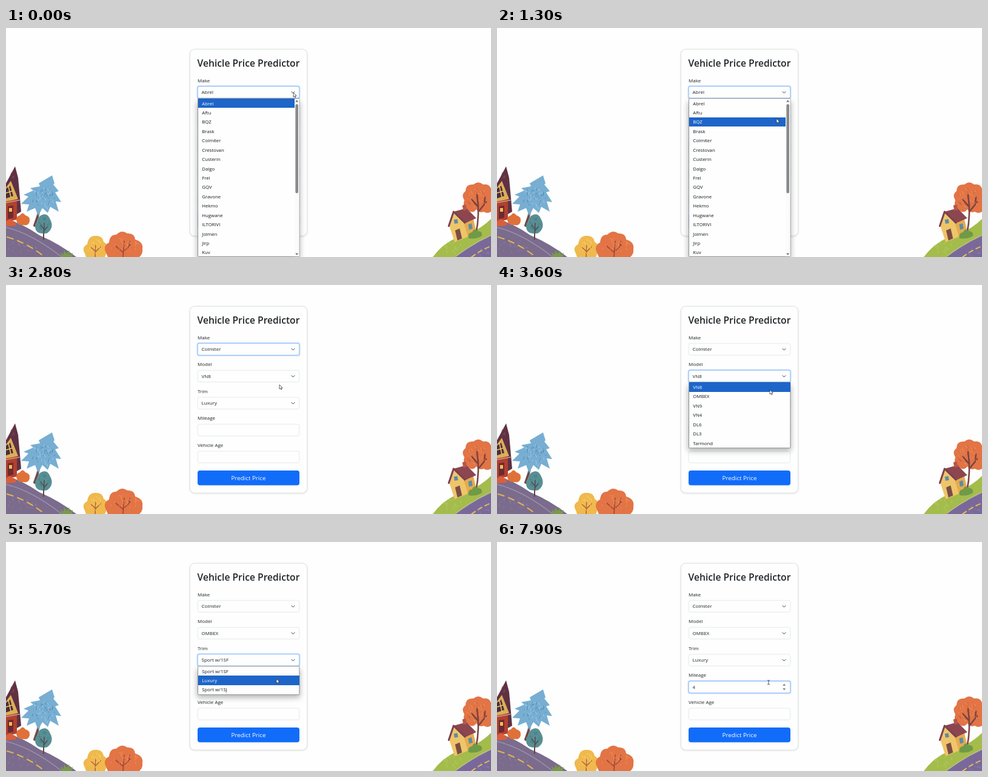
An HTML page that plays this animation: 800x379 px, repeating every 8000 ms.

```html
<!DOCTYPE html>
<html lang="en">
<head>
<meta charset="utf-8">
<title>Vehicle Price Predictor</title>
<style>
  html, body { margin: 0; height: 100%; overflow: hidden; background: #fdfefd; }
  svg { display: block; width: 100vw; height: 100vh; }
  text { font: 8px "Open Sans", "Noto Sans", sans-serif; fill: #212529; }
  .title { font-size: 15.65px; font-weight: 600; text-anchor: middle; }
  .action { font-size: 9.8px; fill: #fff; text-anchor: middle; }
  .option { font-size: 7.8px; fill: #15181b; }
  .option.on { fill: #fff; }
  .line { fill: none; stroke-linecap: round; stroke-linejoin: round; }
</style>
</head>
<body>
<svg viewBox="0 0 800 379">
  <defs>
    <filter id="soft" x="-30%" y="-30%" width="160%" height="160%"><feGaussianBlur stdDeviation="5"/></filter>
    <filter id="faint"><feGaussianBlur stdDeviation="1.5"/></filter>
  </defs>

  <!-- left scenery -->
  <path d="M0 316Q28 324 55 343Q88 357 116 379H0Z" fill="#7b6b8d"/>
  <path class="line" d="M0 330Q42 340 92 379" stroke="#9c91a8" stroke-width="1.5"/>
  <path class="line" d="M2 346Q34 355 64 379" stroke="#dcb552" stroke-width="2.2" stroke-dasharray="10 8"/>
  <path d="M0 257L15 229L20 248L25 304L18 308L0 310Z" fill="#5f3143"/>
  <path d="M0 264L8 253L20 283L0 288Z" fill="#dcae58"/>
  <path d="M0 266l7-5 5 17-12 4Z" fill="#4b2d3d"/>
  <path class="line" d="M0 273l10-3M4 262l4 18" stroke="#f0c863" stroke-width="1.5"/>
  <path d="M0 287l18-3v33l-18 4Z" fill="#b2402f"/>
  <path d="M3 295l9-1v20l-9 2Z" fill="#6b2a32"/>
  <path d="M5 298h5v6h-5Z" fill="#f0bd55"/>
  <path class="line" d="M0 289L22 285" stroke="#c9a58f" stroke-width="1.5"/>
  <path d="M17 318q0-7 6-8q4-7 9 0q8 2 7 10q-2 8-10 6q-10 2-12-8Z" fill="#df7138"/>
  <path d="M0 320q6-6 11-1q7 1 5 8l-16 1Z" fill="#d95f3b"/>
  <path class="line" d="M56 296Q53 312 47 327" stroke="#6f4a48" stroke-width="4"/>
  <path d="M76 244L80 257L78 259L87 270L81 272L91 288L82 287L87 304L73 296L69 306L60 298L53 311L48 298L34 304L38 292L25 291L37 279L29 276L45 269L40 265L56 262L54 257Z" fill="#77aed2"/>
  <path class="line" d="M62 315V350" stroke="#684a46" stroke-width="2"/>
  <path d="M60 309q8-3 12 6q6 10 2 18q-5 9-14 7q-11 0-12-11q0-7 4-9q0-8 8-11Z" fill="#588f94"/>
  <path class="line" d="M62 348l1-25M62 336l6-7M62 332l-5-6" stroke="#5a4549" stroke-width="1.5"/>
  <path d="M92 379l-2-8 5 4 1-7 4 6 4-6 1 7 5-3-2 7Z" fill="#789b49"/>
  <path d="M130 373q-6-10 4-15q2-15 14-14q11-1 13 10q10 6 6 16l-4 9h-31Z" fill="#f0b94d"/>
  <path d="M165 372q-6-11 5-17q1-13 12-13q9-9 18-2q12-1 13 10q14 4 12 16q1 8-5 13h-52Z" fill="#e37446"/>
  <path class="line" d="M147 379l1-20M148 370l8-8M148 370l-8-7" stroke="#b0653c" stroke-width="1.6"/>
  <path class="line" d="M193 379l2-26M194 370l11-11M193 371l-12-10M203 361l1-8" stroke="#a04a3c" stroke-width="1.8"/>

  <!-- right scenery -->
  <path d="M704 379Q719 358 743 347Q778 338 800 316V379Z" fill="#a3bc4b"/>
  <path d="M741 379Q768 358 800 343V379Z" fill="#79699a"/>
  <path class="line" d="M742 378Q768 358 800 343" stroke="#c3bc92" stroke-width="1.5"/>
  <path class="line" d="M768 379Q784 367 800 361" stroke="#e8bf55" stroke-width="2" stroke-dasharray="7 6"/>
  <path d="M756 285q-6-9 2-15q0-12 13-11q8-7 16 0q10-2 13 7v38q-6 4-12 0q-8 3-12-4q-6 8-13 2q-11-3-7-17Z" fill="#e27446"/>
  <path class="line" d="M775 341Q782 308 777 276M780 303l12-15M779 296l-11-12M789 291l1-11" stroke="#7c4440" stroke-width="2.6"/>
  <g transform="rotate(-10 752 324)">
    <path d="M731 324l11-22 14 20 2 25-23 5Z" fill="#efc56a"/>
    <path d="M755 321l17-2 1 24-15 4Z" fill="#e5ab50"/>
    <path d="M741 302l23-2 13 19-20 5Z" fill="#8c4650"/>
    <path class="line" d="M730 324L742 302L757 323" stroke="#7b4150" stroke-width="3"/>
    <path d="M739 333l8-2 1 17-8 2Z" fill="#7b4d45"/>
    <path d="M740 315h6v7h-6ZM762 327l6-1v9l-6 1Z" fill="#5d8da3"/>
    <path d="M758 303v-9h6v9Z" fill="#b3584a"/>
  </g>
  <path d="M763 348q-2-9 6-10q3-8 9-2q8 0 7 8q-9 6-22 4Z" fill="#6f9a48"/>
  <g id="dabs"></g>

  <g id="ui"></g>
</svg>
<script>
const LOOP = 8000, ROW = 15.43;
const TOPS = { make: 96.5, model: 141, trim: 185.6, mileage: 230.2, age: 274.8 };
const LABELS = { make: "Make", model: "Model", trim: "Trim", mileage: "Mileage", age: "Vehicle Age" };
const MAKES = ["Abrel", "Aftu", "BQZ", "Brask", "Colmiter", "Crestovan", "Custerin", "Dalgo", "Frel",
  "GQV", "Gravone", "Hekmo", "Hugwane", "ILTORIVI", "Jolmen", "Jirp", "Kuv"];
const MODELS = ["VN8", "OMBEX", "VN9", "VN4", "DL6", "DL3", "Tarmond"];
const TRIMS = ["Sport w/1SF", "Luxury", "Sport w/1SJ"];

// Pointer tip: time, x, y
const PATH = [[0, 474, 107], [400, 474, 108], [900, 467, 128], [1300, 461, 150], [1900, 456, 184],
  [2300, 455, 186], [2800, 451, 165], [3100, 452, 152], [3300, 452, 152], [3800, 449, 185],
  [4100, 449, 185], [4300, 448, 182], [4750, 448, 196], [5000, 447, 198], [5700, 446, 226.5],
  [6050, 446, 229], [6400, 448, 235], [6700, 448, 232], [8000, 448, 232]];
const MENUS = [
  { field: "make", from: 0, to: 2300, items: MAKES, scroll: true },
  { field: "model", from: 3100, to: 4100, items: MODELS },
  { field: "trim", from: 4800, to: 6050, items: TRIMS }
];

const rect = (x, y, w, h, r, attrs) =>
  `<rect x="${x}" y="${y}" width="${w}" height="${h}" rx="${r}" ${attrs}/>`;
const text = (x, y, s, cls = "") => `<text x="${x}" y="${y}" class="${cls}">${s}</text>`;
const path = (d, attrs) => `<path d="${d}" ${attrs}/>`;

function pointerAt(t) {
  const i = Math.max(1, PATH.findIndex(p => p[0] > t));
  const [t0, x0, y0] = PATH[i - 1], [t1, x1, y1] = PATH[i];
  const u = (t - t0) / (t1 - t0), k = u * u * (3 - 2 * u);
  return [x0 + (x1 - x0) * k, y0 + (y1 - y0) * k];
}

function drawField(name, value, focused) {
  const y = TOPS[name];
  let s = text(316, y - 6.9, LABELS[name]);
  if (focused) s += rect(314.6, y - 1.4, 170.8, 22.6, 4, 'fill="#c1dafc"');
  s += rect(316.2, y + .2, 167.6, 19.4, 3,
    `fill="#fdfefd" stroke="${focused ? "#86b7fe" : "#e1e4e7"}" stroke-width=".8"`);
  s += text(322.5, y + 12.8, value);
  if (name in { make: 1, model: 1, trim: 1 })
    s += path(`M471 ${y + 8.8}l2.5 2.5 2.5-2.5`, 'class="line" stroke="#343a40" stroke-width="1"');
  else if (focused)
    s += path(`M471.3 ${y + 7.6}l2.4-3 2.4 3ZM471.3 ${y + 12}l2.4 3 2.4-3Z`, 'fill="#777"');
  return s;
}

function drawMenu({ field, items, scroll }, pointerY) {
  const y = TOPS[field] + 20, h = scroll ? 261.8 : items.length * ROW + .8;
  const on = Math.max(0, Math.floor((pointerY - y - .6) / ROW));
  let s = rect(315, y + 5, 170, h, 2, 'fill="#000" opacity=".28" filter="url(#soft)"') +
    rect(316.5, y, 167.4, h, 1, 'fill="#fefefe" stroke="#777b80" stroke-width=".8"');
  items.forEach((item, i) => {
    const top = y + .4 + i * ROW;
    if (i === on) s += rect(317, top, scroll ? 159 : 166.5, ROW, 0, 'fill="#1d65c9" shape-rendering="crispEdges"');
    s += text(323.3, top + 10.6, item, i === on ? "option on" : "option");
  });
  if (scroll)
    s += rect(476, y + .5, 7.6, h - 1, 0, 'fill="#fbfbfb"') +
      rect(477.4, y + 9.5, 4.6, 147.5, 2.3, 'fill="#88898a"') +
      path(`M477.2 ${y + 6}l2.5-3.4 2.5 3.4ZM477.2 ${y + 256.2}l2.5 3.4 2.5-3.4Z`, 'fill="#777"');
  return s;
}

function drawPointer(x, y, beam) {
  return `<g transform="translate(${x} ${y})">` + (beam
    ? path("M-1.6-3h1.2l.4.4.4-.4h1.2M0-2.6v5.6M-1.6 3.4h1.2l.4-.4.4.4h1.2", 'class="line" stroke="#333" stroke-width=".8"')
    : path("M0 0V7.2L1.7 5.7 2.8 8.2 4.1 7.6 3 5.2H5.2Z", 'fill="#fff" stroke="#222" stroke-width=".7"')) + "</g>";
}

function render(t) {
  const [x, y] = pointerAt(t);
  const menu = MENUS.find(m => t >= m.from && t < m.to);
  const focus = t < 3100 ? "make" : t < 4800 ? "model" : t < 6400 ? "trim" : "mileage";
  const values = {
    make: t < 2300 ? MAKES[0] : MAKES[4],
    model: t < 2300 ? "" : t < 4100 ? MODELS[0] : MODELS[1],
    trim: t >= 4100 && t < 6050 ? TRIMS[0] : TRIMS[1],
    mileage: t < 7600 ? "" : "4",
    age: ""
  };
  let s = rect(303, 35.8, 194, 309.4, 8, 'fill="#000" opacity=".13" filter="url(#faint)"') +
    rect(303.4, 35.2, 193.2, 309, 8, 'fill="#fdfefd" stroke="#dcdedf" stroke-width=".8"') +
    text(400, 64, "Vehicle Price Predictor", "title");
  for (const name in TOPS) s += drawField(name, values[name], name === focus);
  s += rect(316, 307, 168, 24.6, 4, 'fill="#126cfa"') + text(400, 323.4, "Predict Price", "action");
  if (menu) s += drawMenu(menu, y);
  s += drawPointer(x, y, t >= 6350);
  document.getElementById("ui").innerHTML = s;
}

// Crayon dabs: centre, radii, colour, count
function drawDabs() {
  let seed = 7;
  const rnd = () => (seed = seed * 16807 % 2147483647) / 2147483647;
  const patches = [[60, 281, 21, 17, "#467fae", 30], [60, 281, 20, 17, "#b4d6e8", 24],
    [62, 325, 10, 12, "#397780", 16], [195, 361, 25, 15, "#f29b5a", 30],
    [147, 361, 15, 12, "#f9d67c", 16], [778, 281, 18, 18, "#f2a05b", 24],
    [777, 283, 18, 18, "#c5513b", 14], [27, 361, 24, 13, "#94839f", 20],
    [738, 362, 18, 9, "#c0d067", 16], [785, 369, 14, 8, "#94839f", 10], [11, 244, 4, 8, "#854c59", 6]];
  let s = "";
  for (const [cx, cy, rx, ry, color, n] of patches)
    for (let i = 0; i < n; i++) {
      const a = rnd() * 2 * Math.PI, r = Math.sqrt(rnd());
      s += path(`M${cx + rx * r * Math.cos(a)} ${cy + ry * r * Math.sin(a)}l${rnd() * 3 - 1} ${1 + rnd() * 3}`,
        `class="line" stroke="${color}" stroke-width="1" opacity=".75"`);
    }
  document.getElementById("dabs").innerHTML = s;
}

drawDabs();
const start = performance.now();
function tick() {
  render((performance.now() - start) % LOOP);
  requestAnimationFrame(tick);
}
tick();
</script>
</body>
</html>
```
